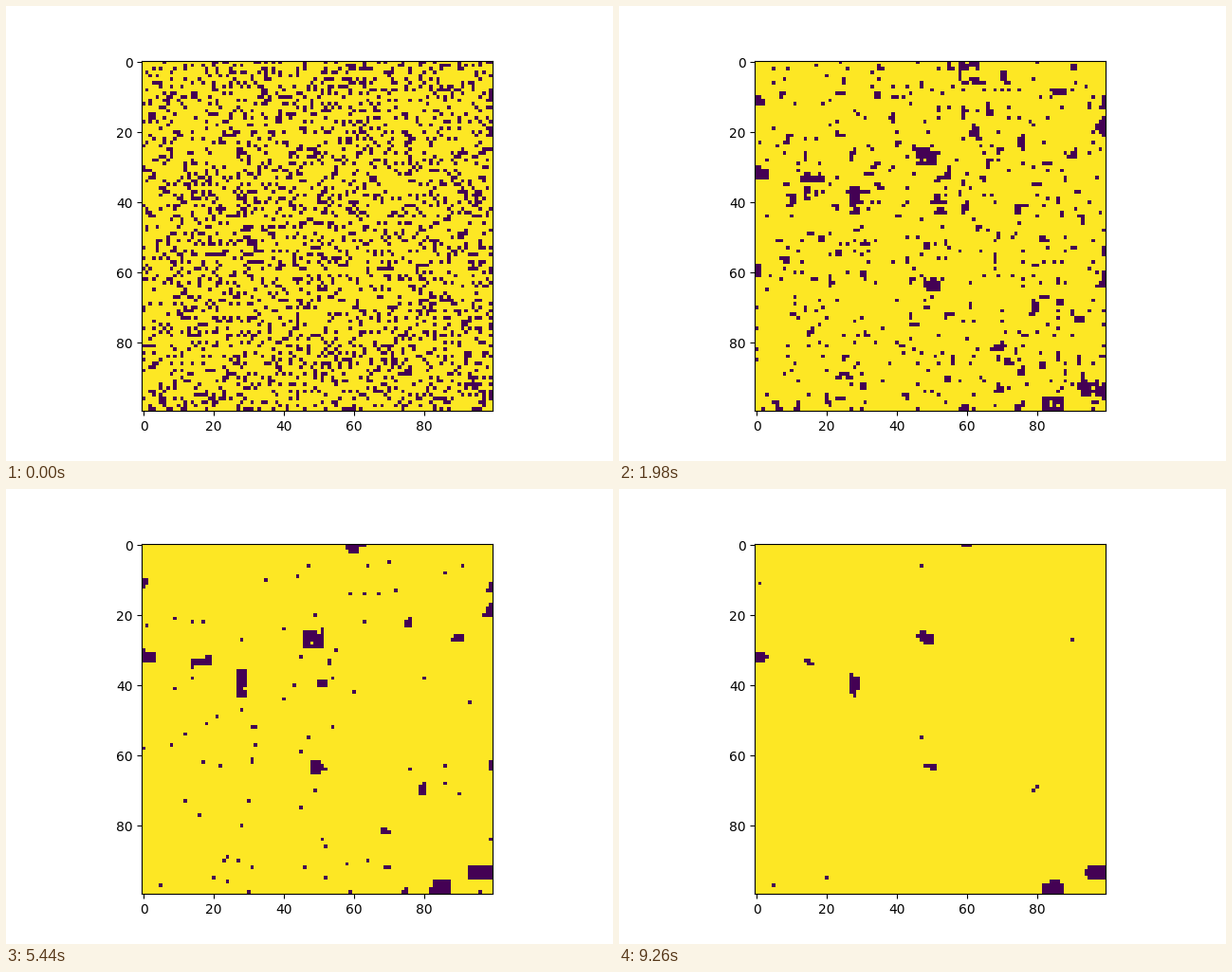
Animation, 640 px wide and 480 px high, one loop 9.28 s. Source, as a matplotlib script:

```python
import numpy as np
import matplotlib.pyplot as plt
from matplotlib.animation import FuncAnimation

SIZE = 100
STATES = 200
VISITS = 335            # spins visited between two states
DARK = 0.22             # dark share at the start
TICKS, TICK_MS = 464, 20

# Long-lived domains (x, y, width, height), slowest first
DOMAINS = [
    (93, 92, 7, 4), (83, 96, 5, 4), (0, 31, 4, 3), (27, 36, 3, 8),
    (46, 25, 6, 5), (58, 0, 4, 3), (48, 62, 5, 4), (0, 10, 3, 3),
]


def start(rng):
    """Random spins inside a border of zeros, and the melting times."""
    melt = np.zeros((SIZE, SIZE), int)
    for rank, (x, y, w, h) in enumerate(DOMAINS):
        melt[y:y + h, x:x + w] = 165 - 12 * rank
    share = np.where(melt > 0, 2 * DARK, DARK)
    spins = np.where(rng.random((SIZE, SIZE)) < share, -1, 1)
    return np.pad(spins, 1).tolist(), melt.tolist()


def flips(spin, field, luck):
    """Zero-temperature rule; ties favour the yellow phase."""
    if field == 0:
        return luck < (0.7 if spin < 0 else 0.3)
    return spin * field < 0


def simulate(seed=7):
    rng = np.random.default_rng(seed)
    s, melt = start(rng)
    history = []
    for k in range(STATES):
        history.append(np.array(s)[1:-1, 1:-1])
        places = rng.integers(1, SIZE + 1, (VISITS, 2)).tolist()
        for (i, j), luck in zip(places, rng.random(VISITS).tolist()):
            if k < melt[i - 1][j - 1]:
                s[i][j] = -1
                continue
            field = s[i - 1][j] + s[i + 1][j] + s[i][j - 1] + s[i][j + 1]
            if flips(s[i][j], field, luck):
                s[i][j] = -s[i][j]
    return history


def state_at(tick):
    """Three states per 140 ms, held for 20, 100 and 20 ms."""
    cycle, phase = divmod(tick, 7)
    return 3 * cycle + (phase > 0) + (phase > 5)


history = simulate()
fig, ax = plt.subplots(figsize=(6.4, 4.8), dpi=100)
image = ax.imshow(history[0], cmap="viridis", vmin=-1, vmax=1,
                  interpolation="nearest")


def draw(tick):
    image.set_data(history[state_at(tick)])
    return [image]


anim = FuncAnimation(fig, draw, frames=TICKS, interval=TICK_MS,
                     repeat=True, repeat_delay=0)
plt.show()
```
